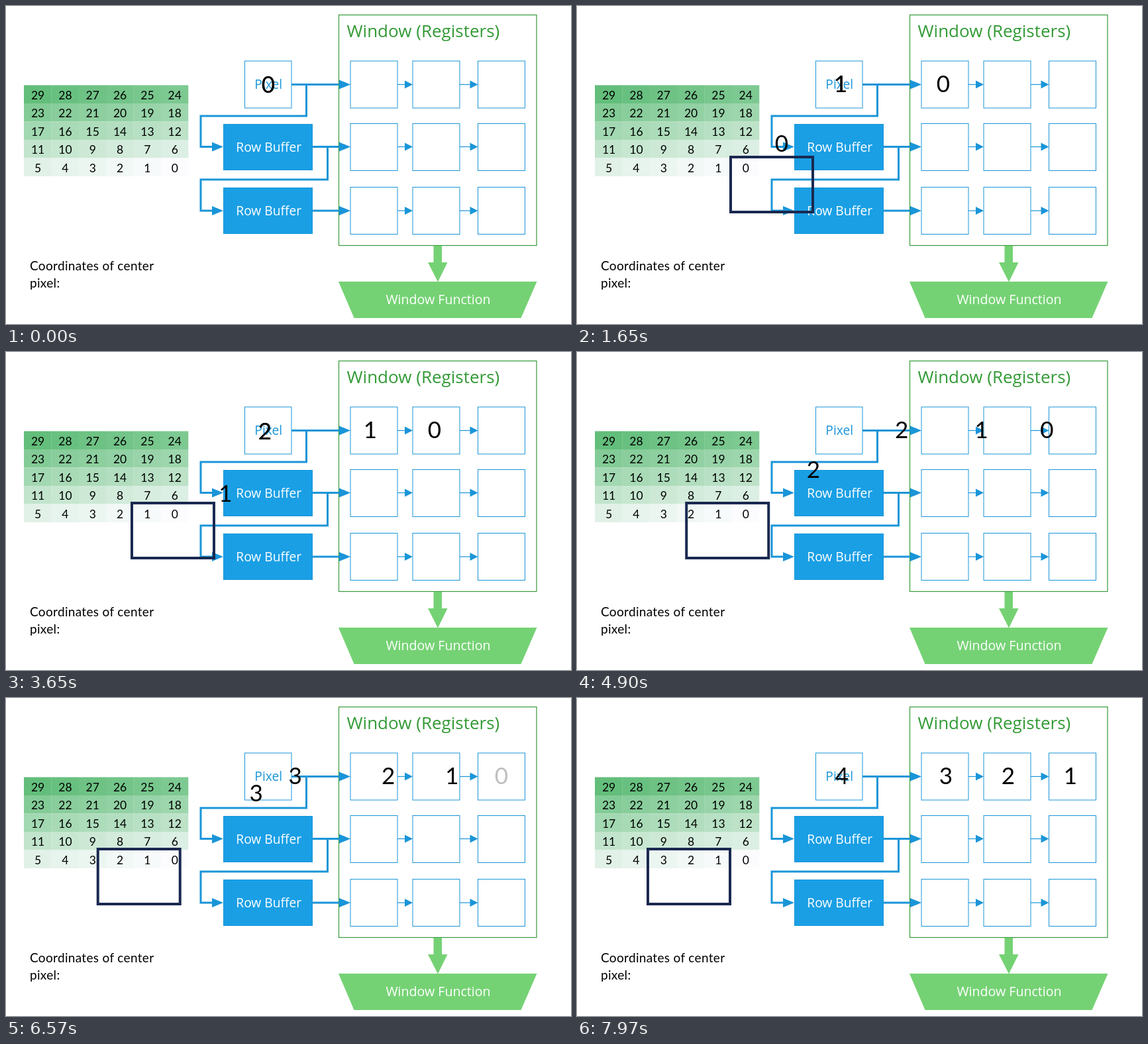
An HTML page for the animation above (8 s loop, 853 px wide and 480 px high).

```html
<!DOCTYPE html>
<html lang="en">
<head>
<meta charset="utf-8">
<title>Sliding window with row buffers</title>
<style>
  html, body { margin: 0; width: 100%; height: 100%; overflow: hidden; background: #fff; }
  svg { display: block; width: 853px; height: 480px; }
  .ui { font-family: "Open Sans", "Noto Sans", sans-serif; font-size: 19.2px; }
  .num { font-family: Lato, "Open Sans", sans-serif; text-anchor: middle; }
  .cell { font-size: 17.5px; }
  .big { font-size: 35px; }
  .note { font-family: Lato, "Open Sans", sans-serif; font-size: 19px; letter-spacing: .33px; }
  .box { fill: #fff; stroke: #1a95d8; }
  .buffer { fill: #1a9fe5; stroke: #1a95d8; }
  .wire { fill: none; stroke: #1a95d8; stroke-width: 3; }
  .thin { stroke-width: 1.2; }
  .head { fill: #1a95d8; }
  .green { fill: #75d274; }
</style>
</head>
<body>
<svg id="stage" viewBox="0 0 853 480">
  <g id="table"></g>
  <rect x="502.5" y="13.5" width="298.5" height="348" fill="#fff" stroke="#379a3a" stroke-width="1.2"/>
  <text class="ui" x="514.5" y="47" style="font-size:26px" fill="#339a36">Window (Registers)</text>
  <path class="green" d="M645.5 362H658V387H666.5L652 416.5L637 387H645.5Z"/>
  <path class="green" d="M502 416H801.5L777.5 471H525.5Z"/>
  <text class="ui" x="652.5" y="450" text-anchor="middle" style="font-size:19.6px" fill="#fff">Window Function</text>
  <g id="diagram"></g>
  <text class="note" x="36" y="399">Coordinates of center</text>
  <text class="note" x="36" y="425">pixel:</text>
  <rect id="focus" y="228" width="124" height="83" fill="none" stroke="#1a2950" stroke-width="4"/>
  <g id="numbers"></g>
</svg>
<script>
const LOOP = 8000, TICK = 60, MOVE = 600, FAST = 240, SLOW = 480;
const BUFFER_FADE = 1100;
const STEPS = [810, 2690, 4540, 6390];
const FOCUS_X = [232, 190, 150, 107];
const REG_Y = 117;

// x: stops in the pixel box and the registers; buf: where the copy enters the row buffer
const NUMBERS = [
  { x: [396, 553, 647, 748], y: 118, buf: [309, 207] },
  { x: [398, 550, 648, 745], y: 117, buf: [331.5, 213.5] },
  { x: [391, 551, 651], y: 119, buf: [336, 213.5] },
  { x: [394, 557], y: 118, buf: [332, 213.5] },
  { x: [400], y: 117, buf: null }
];

const byId = id => document.getElementById(id);

function add(parent, tag, attrs, text) {
  const el = document.createElementNS("http://www.w3.org/2000/svg", tag);
  for (const key in attrs) el.setAttribute(key, attrs[key]);
  if (text !== undefined) el.textContent = text;
  return parent.appendChild(el);
}

const mix = (a, b, p) => a + (b - a) * p;

function drawTable() {
  const w = 248 / 6, h = 27.5, low = [252, 252, 255], high = [99, 190, 123];
  for (let i = 0; i < 30; i++) {
    const col = i % 6, row = Math.floor(i / 6), value = 29 - i;
    const x = 27 + col * w, y = 119.5 + row * h;
    const rgb = low.map((c, k) => Math.round(mix(c, high[k], value / 29)));
    add(byId("table"), "rect", { x, y, width: w + .3, height: h, fill: `rgb(${rgb})` });
    add(byId("table"), "text", { class: "num cell", x: x + w / 2 + .4, y: y + 21.2 }, value);
  }
}

function drawDiagram() {
  const g = byId("diagram");
  const box = (x, y, w, h, cls) => add(g, "rect", { class: cls, x, y, width: w, height: h });
  const arrow = (path, x, y, len, half, thin = "") => {
    add(g, "path", { class: "wire " + thin, d: `${path}H${x - len + 1}` });
    add(g, "path", { class: "head", d: `M${x} ${y}l${-len} ${-half}v${2 * half}Z` });
  };
  const label = (x, y, fill, text) =>
    add(g, "text", { class: "ui", x, y, fill, "text-anchor": "middle" }, text);

  box(360.5, 83, 70.5, 71, "box");
  label(396.2, 125, "#1a95d8", "Pixel");
  for (const y of [178.5, 274.5]) {
    box(328.5, y, 134, 69, "buffer");
    label(396.7, y + 41.5, "#fff", "Row Buffer");
  }
  [83, 177.5, 273.5].forEach((y, row) => {
    const mid = [118.5, 212.5, 309][row];
    for (const x of [520, 614, 712.5]) box(x, y, 71, 71, "box");
    arrow(`M${row ? 463 : 431} ${mid}`, 520, mid, 17, 7);
    arrow(`M591 ${mid}`, 614, mid, 12, 6, "thin");
    arrow(`M685 ${mid}`, 712.5, mid, 12, 6, "thin");
  });
  arrow("M453.5 118.5V166H294V212.5", 328, 212.5, 17, 7);
  arrow("M485.5 212.5V262H294V309", 328, 309, 17, 7);
}

const sprites = NUMBERS.map((n, i) => {
  const make = () => add(byId("numbers"), "text", { class: "num big" }, i);
  return { main: make(), copy: n.buf && make() };
});

function place(el, x, y, opacity) {
  el.setAttribute("x", x);
  el.setAttribute("y", y + 12.6);
  el.setAttribute("opacity", opacity);
}

// Progress advances in whole ticks
function progress(t, start, length) {
  const ticks = Math.floor((t - start + .5) / TICK);
  return Math.min(1, Math.max(0, ticks * TICK / length));
}

// Short ramp up, steady speed, short ramp down
function ease(u) {
  const a = .16, v = 1 / (1 - a);
  if (u < a) return v * u * u / (2 * a);
  if (u > 1 - a) return 1 - v * (1 - u) ** 2 / (2 * a);
  return v * (u - a / 2);
}

function draw(t) {
  const moves = STEPS.map(s => ease(progress(t, s, MOVE)));

  let fx = FOCUS_X[0];
  for (let j = 1; j < STEPS.length; j++) fx += (FOCUS_X[j] - FOCUS_X[j - 1]) * moves[j];
  byId("focus").setAttribute("x", fx);
  byId("focus").setAttribute("opacity", progress(t, STEPS[0], FAST));

  NUMBERS.forEach((n, i) => {
    const shown = i ? progress(t, STEPS[i - 1] + MOVE, FAST) : 1;
    let x = n.x[0];
    for (let k = 1; k < n.x.length; k++) x += (n.x[k] - n.x[k - 1]) * moves[i + k - 1];
    const p = n.buf ? moves[i] : 0;
    const gone = i === 0 ? progress(t, STEPS[3], FAST) : 0;
    place(sprites[i].main, x, mix(n.y, REG_Y, p), shown * (1 - gone));
    if (n.buf) {
      const left = 1 - progress(t, STEPS[i] + BUFFER_FADE, i ? SLOW : FAST);
      place(sprites[i].copy, mix(n.x[0], n.buf[0], p), mix(n.y, n.buf[1], p), shown * left);
    }
  });
}

drawTable();
drawDiagram();
const begin = performance.now();
function loop() {
  draw((performance.now() - begin) % LOOP);
  requestAnimationFrame(loop);
}
loop();
</script>
</body>
</html>
```
